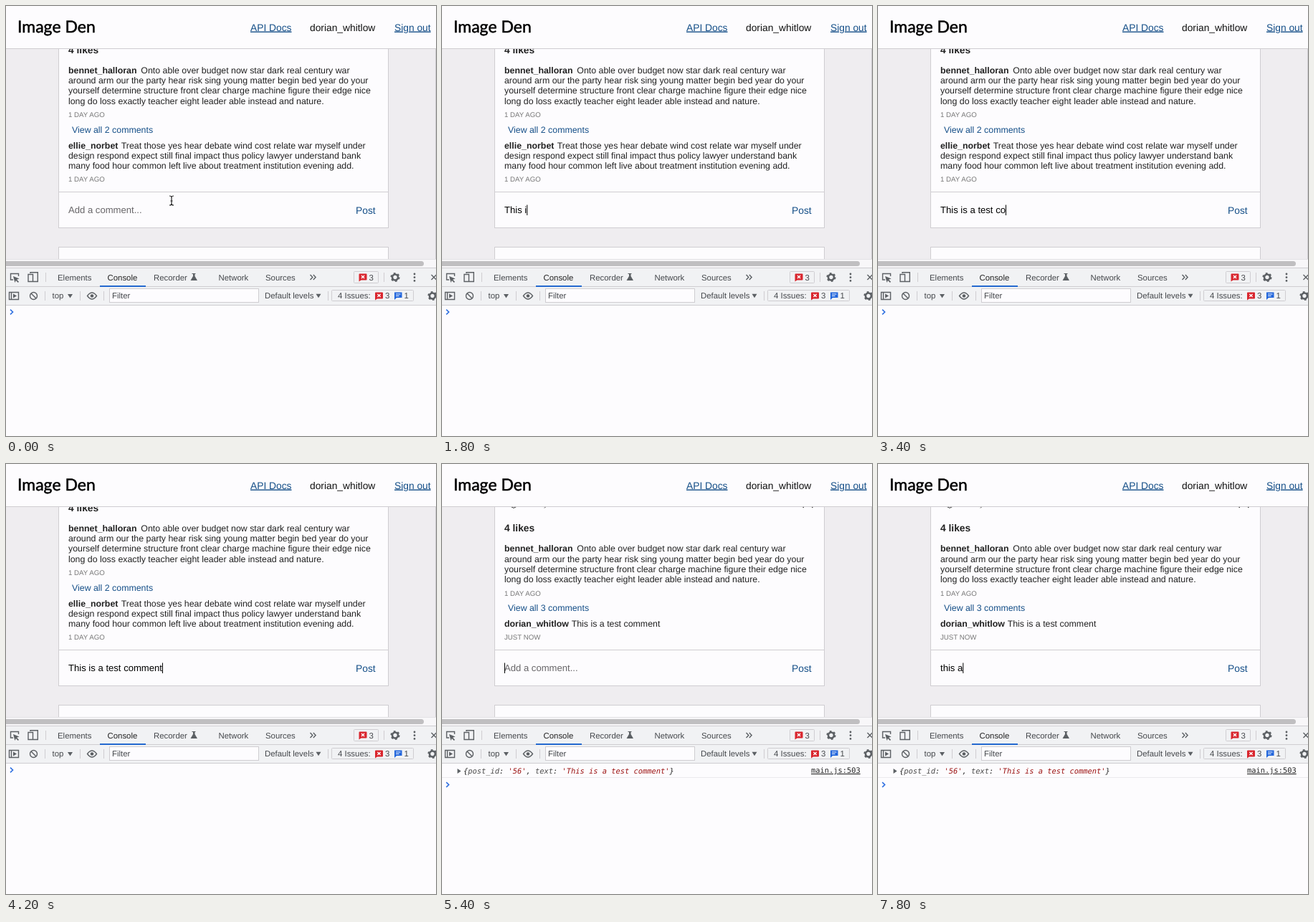
Recreate the animation shown at these times as an HTML page. Size 600 by 600 pixels, loop 8 s.

```html
<!DOCTYPE html>
<html lang="en">
<head>
<meta charset="utf-8">
<title>Posting a comment</title>
<style>
  html, body { margin: 0; width: 100%; height: 100%; overflow: hidden; background: #fdfcfe; }
  svg { display: block; width: 100%; height: 100%; }
  text { white-space: pre; fill: #222; font-family: "Liberation Sans", Arial, sans-serif; text-rendering: geometricPrecision; }
  .post text { font-size: 12.37px; }
  .post .time { font-size: 9.7px; fill: #777; }
  .post .likes { font-size: 13.8px; }
  .bold { font-weight: bold; }
  .nav { font-size: 13.8px; fill: #111; }
  .link, .post .link { fill: #154f88; }
  .under { text-decoration: underline; }
  .entry { font-size: 13.1px; }
  .tools text { font-size: 11.4px; fill: #45484c; }
  .mono text { font: 10.38px "DejaVu Sans Mono", monospace; }
  .mono .object { font-style: italic; }
  .key { fill: #4a4a4a; }
  .string { fill: #9c1212; }
  .icon { fill: none; stroke: #5c6064; stroke-width: 1.4; }
  .solid { fill: #5c6064; }
  .rule { fill: none; stroke: #cfcdd1; }
  .field { fill: #fdfcfe; stroke: #cfcdd1; }
  .prompt { fill: none; stroke: #2f6fe0; stroke-width: 1.6; }
</style>
</head>
<body>
<svg viewBox="0 0 600 600">
  <defs>
    <g id="gear">
      <circle r="4" fill="none" stroke="#5c6064" stroke-width="2.6"/>
      <circle r="5.6" fill="none" stroke="#5c6064" stroke-width="2" stroke-dasharray="2.7 3.165"/>
    </g>
    <g id="error">
      <path d="M1 0h9q1 0 1 1v7q0 1-1 1h-7l-3 2v-10q0-1 1-1z" fill="#d9262e"/>
      <path d="M3.4 2.4l4.2 4.2m0-4.2l-4.2 4.2" stroke="#fff" stroke-width="1.4"/>
    </g>
    <path id="arrow" class="solid" d="M0 0h7l-3.5 5.5z"/>
  </defs>

  <rect width="600" height="600" fill="#fdfcfe"/>
  <rect y="59" width="600" height="295" fill="#efedf0"/>
  <rect class="field" x="73.5" y="40.5" width="460" height="269"/>
  <rect class="field" x="73.5" y="336.5" width="460" height="30"/>
  <path class="rule" d="M74 259.5H533"/>

  <g class="post">
    <g id="caption">
      <path d="M96 31l4 2 4-2M118 31h8M146 30l-3 3M504 28v4.6l2-2M517 28v4.6l-2-2" fill="none" stroke="#333"/>
      <text class="likes bold" x="87" y="65.8">4 likes</text>
      <text class="bold" x="87" y="94">bennet_halloran</text>
      <text x="188.3" y="94">Onto able over budget now star dark real century war</text>
      <text x="87" y="108.2">around arm our the party hear risk sing young matter begin bed year do your</text>
      <text x="87" y="122.4">yourself determine structure front clear charge machine figure their edge nice</text>
      <text x="87" y="136.6">long do loss exactly teacher eight leader able instead and nature.</text>
      <text class="time" x="87" y="155.4">1 DAY AGO</text>
      <text class="link" id="viewAll" x="92" y="176.8"></text>
    </g>
    <g id="oldComment">
      <text class="bold" x="87" y="198.8">ellie_norbet</text>
      <text x="160.7" y="198.8">Treat those yes hear debate wind cost relate war myself under</text>
      <text x="87" y="213">design respond expect still final impact thus policy lawyer understand bank</text>
      <text x="87" y="227.2">many food hour common left live about treatment institution evening add.</text>
      <text class="time" x="87" y="245.4">1 DAY AGO</text>
    </g>
    <g id="newComment">
      <text class="bold" x="87" y="227.2">dorian_whitlow</text>
      <text x="180.7" y="227.2">This is a test comment</text>
      <text class="time" x="87" y="245.4">JUST NOW</text>
    </g>
  </g>

  <text class="entry" id="entry" x="87" y="289.4"></text>
  <path id="caret" d="M.5 277.5v14.5" stroke="#000"/>
  <text class="nav link" x="488" y="289.6">Post</text>
  <rect id="focusRing" x="482.5" y="276" width="38.5" height="17.5" rx="3" fill="none" stroke="#255fae" stroke-width="2"/>
  <path id="pointer" d="M228 265q3 0 3 2q0-2 3-2M231 267v9M228 278q3 0 3-2q0 2 3 2M229.5 272h3" fill="none" stroke="#222" stroke-width="1.2"/>

  <rect width="600" height="59" fill="#fdfcfe"/>
  <path class="rule" d="M0 59.5H600M599.5 59V353"/>
  <text x="16" y="37" style="font:23px Lato,sans-serif;fill:#000;stroke:#000;stroke-width:.5;stroke-linejoin:round">Image Den</text>
  <text class="nav link under" x="341" y="34.5">API Docs</text>
  <text class="nav" x="424" y="34.5">dorian_whitlow</text>
  <text class="nav link under" x="542" y="34.5">Sign out</text>

  <rect y="353" width="600" height="13" fill="#f8f7f9"/>
  <path class="rule" d="M0 353.5H600" stroke-opacity=".5"/>
  <rect x="-5" y="356" width="588" height="7" rx="3.5" fill="#c0bfc1"/>

  <g class="tools">
    <rect y="365" width="600" height="53" fill="#f1f2f4"/>
    <path class="rule" d="M0 365.5H600M0 391.5H600M0 417.5H600M55.5 372v13M527.5 372v13M54.5 398v13M103.5 398v13M136.5 398v13M449.5 398v13"/>

    <path class="icon" d="M10 382H6.500V373.500H17.500V377"/>
    <path class="solid" d="M10 377l8.500 3.500-3.500 1.300 3 3-1.200 1.200-3-3-1.400 3z"/>
    <path class="icon" d="M34 373V371.700H44.300V384.500H38M31 374.500h6.500v10H31z"/>
    <text x="72" y="382.5">Elements</text>
    <text x="141.500" y="382.5" style="fill:#222">Console</text>
    <rect x="131" y="390" width="64" height="2" fill="#2469cf"/>
    <text x="206" y="382.5">Recorder</text>
    <path class="solid" d="M259.500 373h5v1h-1v3l3.500 6h-9.500l3.500-6v-3h-1.500z"/>
    <text x="296.500" y="382.5">Network</text>
    <text x="362" y="382.5">Sources</text>
    <path class="icon" d="M424.500 375l3.300 3.500-3.300 3.500M428.800 375l3.300 3.500-3.300 3.500"/>
    <rect class="rule" x="485.500" y="370.500" width="34" height="16" rx="1"/>
    <use href="#error" x="492.500" y="373.500"/>
    <text x="506.500" y="382.5">3</text>
    <use href="#gear" x="543" y="378.500"/>
    <path d="M570 374h.01m-.01 4.700h.01m-.01 4.700h.01" stroke="#5c6064" stroke-width="2.8" stroke-linecap="round"/>
    <path class="icon" d="M593.500 375l7 7m0-7l-7 7"/>

    <path class="icon" d="M4.500 399.500H17.500V409.500H4.500zM7.500 399.500v10"/>
    <path class="solid" d="M10 401.500l5 3-5 3z"/>
    <circle class="icon" cx="38.500" cy="404.500" r="5"/>
    <path class="icon" d="M35 401l7 7"/>
    <text x="64.500" y="408.3">top</text>
    <use href="#arrow" x="86" y="402"/>
    <path class="icon" d="M113.500 404.500q6.500-9 13 0q-6.500 9-13 0z"/>
    <circle class="solid" cx="120" cy="404.500" r="2.300"/>
    <rect class="field" x="144.500" y="394.500" width="208" height="19"/>
    <text x="148" y="408.3">Filter</text>
    <text x="361" y="408.3">Default levels</text>
    <use href="#arrow" x="432.500" y="401.700"/>
    <rect class="rule" x="454.500" y="396.500" width="114" height="15" rx="1"/>
    <text x="463" y="408.3">4 Issues:</text>
    <use href="#error" x="515" y="399.500"/>
    <text x="529" y="408.3">3</text>
    <path d="M542 399.500h10.500v7.500h-7.500l-3 3z" fill="#2266dc"/>
    <path d="M544 402h6.500m-6.500 2.500h4.500" stroke="#fff"/>
    <text x="555.500" y="408.3">1</text>
    <use href="#gear" x="595" y="404.500"/>
  </g>

  <g class="mono" id="log">
    <path class="rule" d="M0 437.5H600" stroke-opacity=".4"/>
    <path class="solid" d="M21.500 425l5 3.500-5 3.500z"/>
    <text class="object" x="30" y="432">{<tspan class="key">post_id</tspan>: <tspan class="string">'56'</tspan>, <tspan class="key">text</tspan>: <tspan class="string">'This is a test comment'</tspan>}</text>
    <text class="under" x="515" y="431">main.js:503</text>
  </g>
  <path class="prompt" id="prompt" d="M6 423.700l3.500 3.300-3.500 3.300"/>
</svg>

<script>
const LOOP = 8000, STEP = 200;
const CLICK = 400, FIRST_TYPING = 930, FOCUS_POST = 4600, SUBMIT = 5400, SECOND_TYPING = 7080;
const FIRST = "This is a test comment", SECOND = "this a";
const part = id => document.getElementById(id);
const show = (id, on) => part(id).setAttribute("visibility", on ? "visible" : "hidden");
const move = (id, x, y) => part(id).setAttribute("transform", `translate(${x} ${y})`);
const typing = (text, elapsed, perKey) => text.slice(0, Math.max(0, Math.floor(elapsed / perKey)));

const typedText = t => t < SUBMIT
  ? typing(FIRST, t - FIRST_TYPING, 145)
  : typing(SECOND, t - SECOND_TYPING, 120);

function caretVisible(t, typed) {
  if (t < CLICK || (t >= FOCUS_POST && t < SUBMIT)) return false;
  if (typed) return true;
  const since = t < SUBMIT ? t - CLICK : t - SUBMIT;
  return since % 1000 < 500;
}

function draw(t) {
  const posted = t >= SUBMIT;
  const typed = typedText(t);
  const entry = part("entry");
  entry.textContent = typed || "Add a comment...";
  entry.style.fill = typed ? "#000" : "#686669";

  show("caret", caretVisible(t, typed));
  move("caret", 87 + (typed ? entry.getComputedTextLength() : 0), 0);
  show("pointer", t < SUBMIT && !typed);
  show("focusRing", t >= FOCUS_POST && !posted);

  part("viewAll").textContent = `View all ${posted ? 3 : 2} comments`;
  move("caption", 0, posted ? 28.4 : 0);
  show("oldComment", !posted);
  show("newComment", posted);
  show("log", posted);
  move("prompt", 0, posted ? 20.5 : 0);
}

function tick() {
  const t = performance.now() % LOOP;
  draw(Math.floor(t / STEP) * STEP);
  requestAnimationFrame(tick);
}
tick();
</script>
</body>
</html>
```
